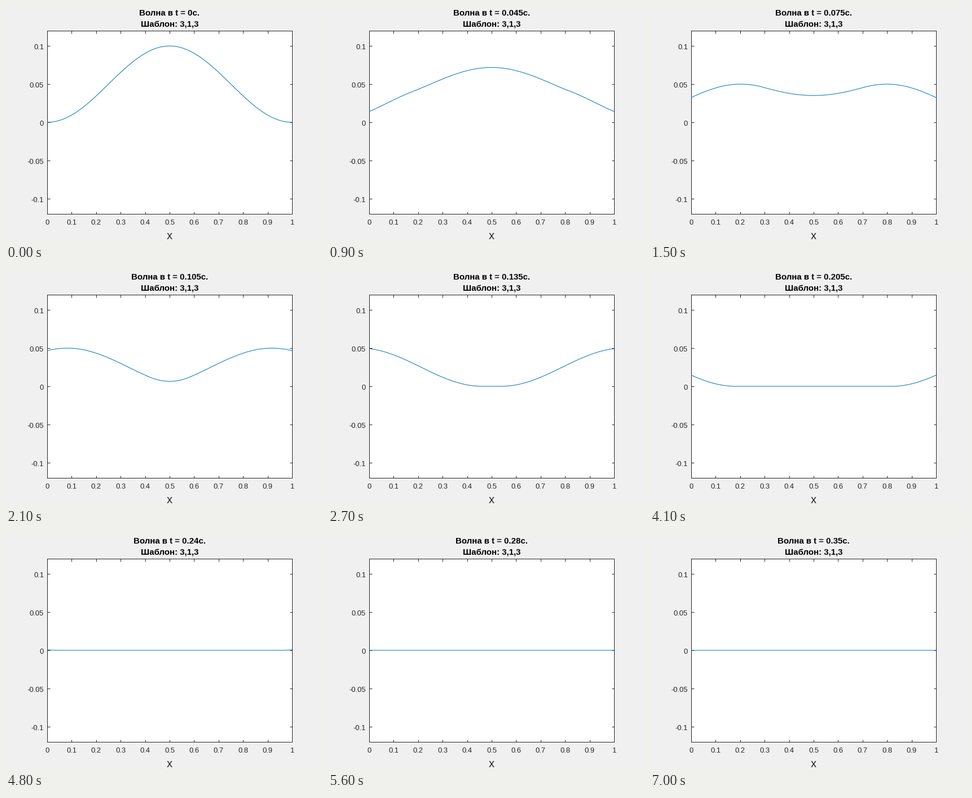
These frames come from a looping animation (560x420 px, 7100 ms). A matplotlib script:

```python
import numpy as np
import matplotlib.pyplot as plt
from matplotlib.animation import FuncAnimation

W, H, DPI = 560, 420, 100
LEFT, RIGHT, TOP, BOTTOM = 73, 507, 44, 370
FRAMES, INTERVAL = 71, 100
DT, SPEED = 0.005, 4
LAG = 0.0005  # the wave starts from rest, half a solver step late
DARK, BLUE = "#262626", "#0072BD"
PT = 72 / DPI  # points per pixel

plt.rcParams["font.family"] = "Liberation Sans"
plt.rcParams["path.simplify"] = False

fig = plt.figure(figsize=(W / DPI, H / DPI), dpi=DPI, facecolor="#F0F0F0")
ax = fig.add_axes([LEFT / W, 1 - BOTTOM / H,
                   (RIGHT - LEFT) / W, (BOTTOM - TOP) / H], facecolor="white")
ax.set_xlim(0, 1)
ax.set_ylim(-0.12, 0.12)
x_ticks = np.arange(11) / 10
y_ticks = np.arange(-2, 3) / 20
ax.set_xticks(x_ticks)
ax.set_yticks(y_ticks)
ax.tick_params(direction="in", top=True, right=True, length=4.5 * PT,
               width=PT, color=DARK, labelbottom=False, labelleft=False)
for spine in ax.spines.values():
    spine.set(linewidth=PT, edgecolor=DARK)


def put(x, baseline, text, size=13, color=DARK, ha="center", weight="normal"):
    """Place text by its baseline, in pixels from the top left corner."""
    return fig.text(x / W, 1 - baseline / H, text, fontsize=size * PT,
                    color=color, ha=ha, va="baseline", fontweight=weight)


for v in x_ticks:
    put(LEFT + v * (RIGHT - LEFT), 389, f"{v:g}")
for v in y_ticks:
    y = (TOP + BOTTOM) / 2 - v / 0.24 * (BOTTOM - TOP)
    put(67, round(y) + 6, f"{v:g}", ha="right")
put(290, 415, "x", size=20)
title = put(290, 17, "", size=15, color="black", weight="bold")
put(290, 37, "Шаблон: 3,1,3", size=15, color="black", weight="bold")

xs = np.linspace(0, 1, 201)
curve, = ax.plot(xs, 0 * xs, color=BLUE, linewidth=PT, zorder=5,
                 clip_on=False, snap=False, solid_capstyle="butt")


def hump(x):
    return np.where((x > 0) & (x < 1), 0.1 * np.sin(np.pi * x) ** 2, 0)


def update(i):
    # The hump splits into two halves that leave through open ends.
    t = i * DT
    shift = SPEED * max(t - LAG, 0)
    curve.set_ydata((hump(xs - shift) + hump(xs + shift)) / 2)
    title.set_text(f"Волна в t = {t:g}с.")
    return curve, title


anim = FuncAnimation(fig, update, frames=FRAMES, interval=INTERVAL,
                     repeat=True, repeat_delay=0, blit=False)
plt.show()
```
